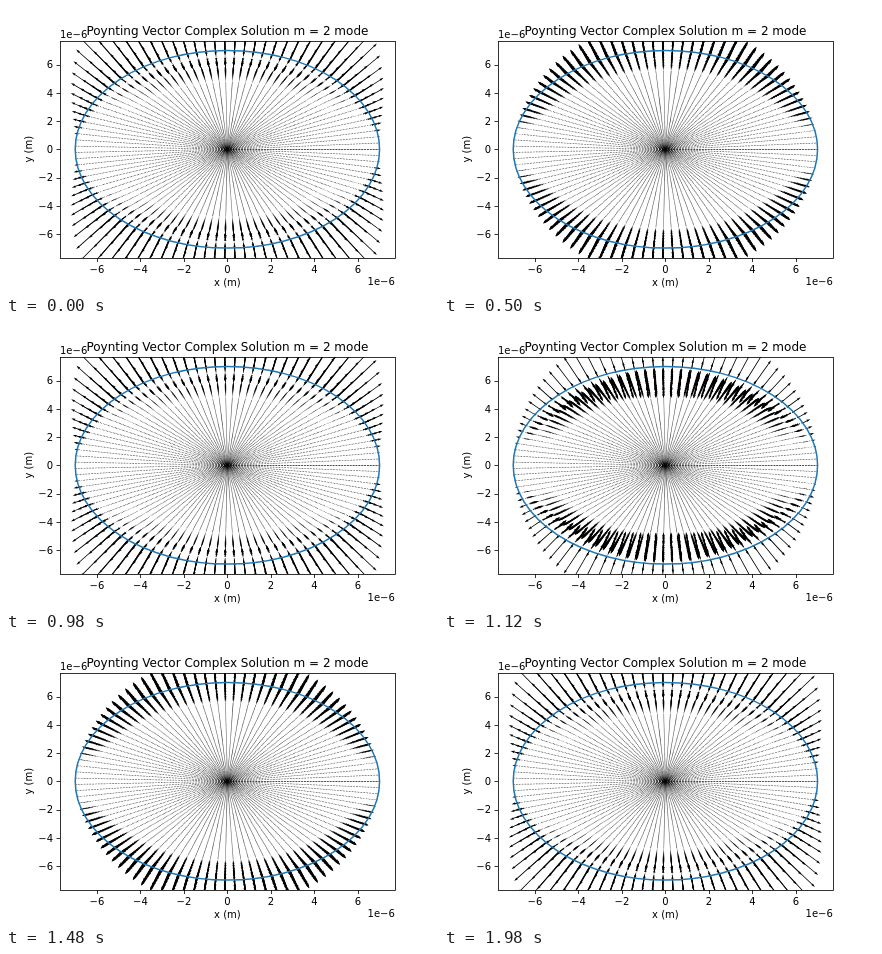
These frames come from a looping animation (432x288 px, 2 s). An HTML page with a canvas:

```html
<!DOCTYPE html>
<html lang="en">
<head>
<meta charset="utf-8">
<title>Poynting vector</title>
<style>
  html, body { margin: 0; width: 100%; height: 100%; overflow: hidden; background: #fff; }
  canvas { display: block; width: 432px; height: 288px; }
</style>
</head>
<body>
<canvas id="stage" width="432" height="288"></canvas>
<script>
const W = 432, H = 288;
const BOX = { l: 54, r: 388.8, t: 34.56, b: 252 };
const CX = (BOX.l + BOX.r) / 2, CY = (BOX.t + BOX.b) / 2;
const SX = (BOX.r - BOX.l) / 15.4, SY = (BOX.b - BOX.t) / 15.4;
const RADIUS = 7, NR = 100, NT = 100;
const STILL = 60;                       // rings below this index are always dots
const SHAFT = 0.0024 * (BOX.r - BOX.l); // arrow shaft width
const MEAN = (BOX.r - BOX.l) / (1.8 * Math.sqrt(NR * NT)); // mean arrow length
const DEPTH = 0.39;                     // decay length of the energy flow
const PHASE = 73 * Math.PI / 180;
const STEP = 20, FRAMES = 100;
const FONT = '"DejaVu Sans", Verdana, sans-serif';

const rays = Array.from({ length: NT }, (_, i) => {
  const a = 2 * Math.PI * i / (NT - 1);
  return { c: Math.cos(a), s: Math.sin(a), w: Math.sin(a) ** 2 };
});
const meanW = rays.reduce((sum, q) => sum + q.w, 0) / NT;

const ringR = j => RADIUS * j / (NR - 1);
const snap = v => Math.floor(v + 0.5) + 0.5;

function makeLayer() {
  const c = document.createElement('canvas');
  c.width = W;
  c.height = H;
  return c.getContext('2d');
}

// Radial flow at each ring, before scaling
function flow(tau) {
  const out = [];
  for (let j = 0; j < NR; j++) {
    const r = ringR(j), x = (RADIUS - r) / DEPTH;
    out.push(j ? Math.exp(-x) * (Math.SQRT1_2 + Math.cos(tau + x)) * RADIUS / r : 0);
  }
  return out;
}

// One arrow in units of the shaft width; short ones shrink, tiny ones become hexagons
function arrow(g, x, y, c, s, len) {
  const n = Math.abs(len) / SHAFT;
  const dir = len < 0 ? -1 : 1;
  const ux = c * dir * SHAFT, uy = -s * dir * SHAFT;
  const put = (a, b, k) => {
    const px = x + (a * ux - b * uy) * k, py = y + (a * uy + b * ux) * k;
    g.lineTo(px, py);
  };
  g.beginPath();
  if (n < 1) {
    for (let k = 0; k < 6; k++) {
      put(0.5 * Math.cos(k * Math.PI / 3), 0.5 * Math.sin(k * Math.PI / 3), 1);
    }
  } else {
    const L = Math.max(n, 5), k = n / L;
    put(0, 0.5, k);
    put(L - 4.5, 0.5, k);
    put(L - 5, 1.5, k);
    put(L, 0, k);
    put(L - 5, -1.5, k);
    put(L - 4.5, -0.5, k);
    put(0, -0.5, k);
  }
  g.closePath();
  g.fill();
}

function drawRings(g, from, to, lengths) {
  for (let j = from; j < to; j++) {
    const r = ringR(j);
    for (const q of rays) {
      arrow(g, CX + r * q.c * SX, CY - r * q.s * SY, q.c, q.s, lengths ? lengths[j] * q.w : 0);
    }
  }
}

function segment(g, x1, y1, x2, y2) {
  g.beginPath();
  g.moveTo(x1, y1);
  g.lineTo(x2, y2);
  g.stroke();
}

function text(g, str, x, y, size, align) {
  g.font = size + 'px ' + FONT;
  g.textAlign = align;
  g.fillText(str, x, y);
}

function drawAxes(g) {
  const l = snap(BOX.l), r = snap(BOX.r), t = snap(BOX.t), b = snap(BOX.b);
  g.lineWidth = 0.8;
  g.strokeStyle = g.fillStyle = '#000';
  g.strokeRect(l, t, r - l, b - t);
  for (let v = -6; v <= 6; v += 2) {
    const x = CX + v * SX, y = CY - v * SY;
    const label = String(v).replace('-', '\u2212');
    segment(g, snap(x), BOX.b, snap(x), BOX.b + 4);
    segment(g, BOX.l - 3.5, snap(y), BOX.l, snap(y));
    text(g, label, x, 267, 10, 'center');
    text(g, label, 47, Math.round(y + 3.8), 10, 'right');
  }
  text(g, 'Poynting Vector Complex Solution m = 2 mode', CX, 29, 12, 'center');
  text(g, '1e\u22126', BOX.l, 32, 10, 'left');
  text(g, '1e\u22126', BOX.r, 279, 10, 'right');
  text(g, 'x (m)', CX, 280, 10, 'center');
  g.save();
  g.translate(26, CY);
  g.rotate(-Math.PI / 2);
  text(g, 'y (m)', 0, 0, 10, 'center');
  g.restore();
}

const dots = makeLayer();
drawRings(dots, 0, STILL, null);
const axes = makeLayer();
drawAxes(axes);

const ctx = document.getElementById('stage').getContext('2d');

function draw(frame) {
  const s = flow(PHASE + 4 * Math.PI * frame / (FRAMES - 1));
  const meanS = s.reduce((sum, v) => sum + Math.abs(v), 0) / NR;
  const lengths = s.map(v => v * MEAN / (meanS * meanW));

  ctx.fillStyle = '#fff';
  ctx.fillRect(0, 0, W, H);
  ctx.save();
  ctx.beginPath();
  ctx.rect(54, 35, 335, 217);
  ctx.clip();
  ctx.drawImage(dots.canvas, 0, 0);
  ctx.fillStyle = '#000';
  drawRings(ctx, STILL, NR, lengths);
  ctx.strokeStyle = '#1f77b4';
  ctx.lineWidth = 1.5;
  ctx.beginPath();
  ctx.ellipse(CX, CY, RADIUS * SX, RADIUS * SY, 0, 0, 2 * Math.PI);
  ctx.stroke();
  ctx.restore();
  ctx.drawImage(axes.canvas, 0, 0);
}

const start = performance.now();
let shown = -1;

function tick() {
  const frame = Math.floor((performance.now() - start) / STEP) % FRAMES;
  if (frame !== shown) draw(shown = frame);
  requestAnimationFrame(tick);
}
tick();
</script>
</body>
</html>
```
